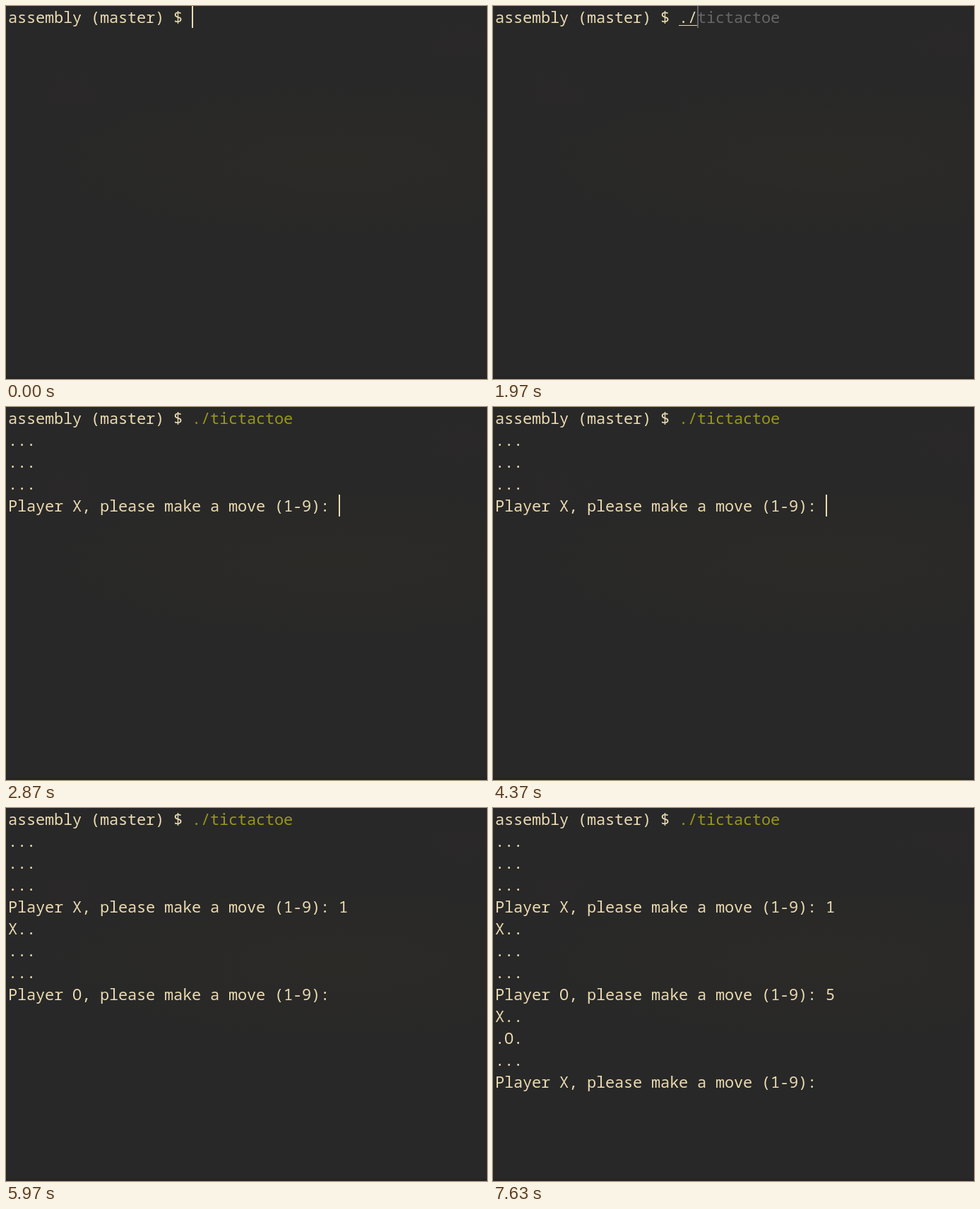
Recreate the animation shown at these times as an HTML page. Size 681x528 px, loop 8 s.

```html
<!DOCTYPE html>
<html lang="en">
<head>
<meta charset="utf-8">
<title>Terminal</title>
<style>
  html, body { margin: 0; width: 100%; height: 100%; overflow: hidden; background: #282828; }
  #term {
    position: relative; width: 681px; height: 528px; overflow: hidden;
    background:
      linear-gradient(#262525, #262525) 0 524px / 100% 4px no-repeat,
      radial-gradient(ellipse 210px 100px at 90px 120px, #2b282880, #2b282800),
      radial-gradient(ellipse 320px 110px at 660px 50px, #2b282880, #2b282800),
      radial-gradient(ellipse 420px 110px at 470px 220px, #2b2a27, #2b2a2700),
      #282828;
  }
  #text {
    position: absolute; left: 3px; top: 0; margin: 0; color: #ebdbb2;
    font: 22px/31px "Noto Sans Mono", monospace; letter-spacing: -0.2px;
    font-variant-ligatures: none; white-space: pre;
  }
  .path { text-decoration: underline 1px; text-underline-offset: 3px; text-decoration-skip-ink: none; }
  .hint { color: #666; }
  .cmd { color: #98971a; }
  #cursor { position: absolute; width: 2px; height: 31px; }
</style>
</head>
<body>
<div id="term"><pre id="text"></pre><div id="cursor"></div></div>
<script>
const LOOP = 8000, CELL = 13, ROW = 31, LEFT = 3;
const text = document.getElementById('text');
const cursor = document.getElementById('cursor');

const span = (cls, s) => `<span class="${cls}">${s}</span>`;
const ask = who => `Player ${who}, please make a move (1-9): `;
const shell = 'assembly (master) $ ';
const typed = (s, hint = '') => shell + span('path', s) + span('hint', hint);
const ready = shell + span('cmd', './tictactoe');
const turn1 = ready + '\n...\n...\n...\n' + ask('X');
const turn2 = turn1 + '1\nX..\n...\n...\n' + ask('O');
const turn3 = turn2 + '5\nX..\n.O.\n...\n' + ask('X');

// start ms, screen, cursor column (-1 = hidden), cursor row, cursor colour
const steps = [
  [0, shell, 20, 0],
  [400, shell, -1, 0],
  [1230, shell, 20, 0],
  [1900, shell + '.', 21, 0],
  [1930, typed('./'), 22, 0],
  [1970, typed('./', 'tictactoe'), 22, 0, '#666'],
  [2130, typed('./t', 'ictactoe'), 23, 0, '#666'],
  [2230, typed('./ti', 'ctactoe'), 24, 0, '#666'],
  [2530, ready, 32, 0],
  [2870, turn1, 36, 4],
  [3600, turn1, -1, 4],
  [4370, turn1, 36, 4],
  [5100, turn1 + '1', 37, 4],
  [5200, turn2, 36, 8],
  [5970, turn2, -1, 8],
  [6700, turn2, 36, 8],
  [6800, turn2 + '5', 37, 8],
  [6900, turn3, 36, 12],
  [7630, turn3, -1, 12]
];

let shown = null;
function draw(t) {
  const step = steps.findLast(s => s[0] <= t);
  if (step === shown) return;
  shown = step;
  const [, screen, col, row, color = '#ebdbb2'] = step;
  text.innerHTML = screen;
  cursor.style.display = col < 0 ? 'none' : 'block';
  cursor.style.left = LEFT + col * CELL + 'px';
  cursor.style.top = row * ROW + 'px';
  cursor.style.background = color;
}

const start = performance.now();
function tick() {
  draw((performance.now() - start) % LOOP);
  requestAnimationFrame(tick);
}
tick();
</script>
</body>
</html>
```
